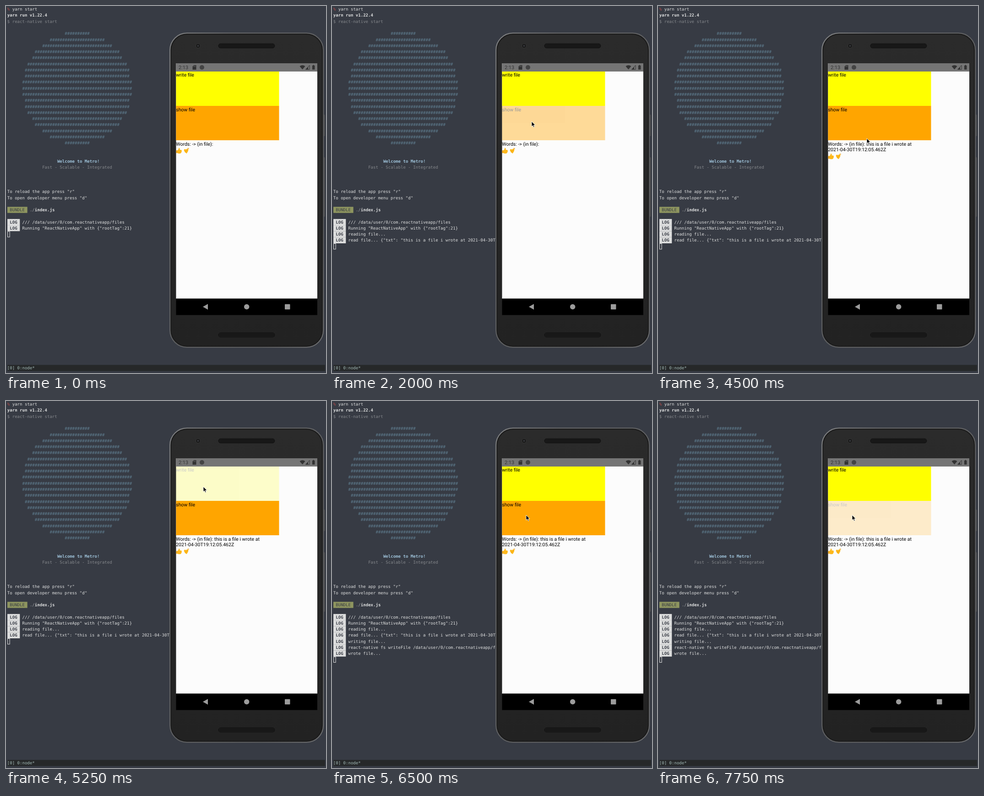
Recreate the animation shown at these times as an HTML page. Size 699 by 801 pixels, loop 8 s.

```html
<!DOCTYPE html>
<html lang="en">
<head>
<meta charset="utf-8">
<title>File read and write demo</title>
<style>
  html, body { margin: 0; width: 100%; height: 100%; overflow: hidden; background: #373b44; }
  svg { display: block; width: 699px; height: 801px; }
  text { white-space: pre; text-rendering: geometricPrecision; }
  #term text { font: 9.06px "DejaVu Sans Mono", monospace; fill: #dfe0e0; }
  #term .b { font-weight: 700; }
  #term .dim { fill: #85888c; }
  #term .hash { fill: #5f7d8f; }
  #term .tag { fill: #373b44; }
  #phone text { font: 10.55px Roboto, sans-serif; fill: #000; }
</style>
</head>
<body>
<svg viewBox="0 0 699 801" xmlns="http://www.w3.org/2000/svg">
  <defs>
    <linearGradient id="rim" x1="0" y1="0" x2="1" y2="1">
      <stop offset="0" stop-color="#7f8082"/>
      <stop offset=".2" stop-color="#646567"/>
      <stop offset=".8" stop-color="#5a5b5d"/>
      <stop offset="1" stop-color="#6c6d6f"/>
    </linearGradient>
    <linearGradient id="face" x1="0" y1="0" x2="0" y2="1">
      <stop offset="0" stop-color="#2b2b2b"/>
      <stop offset="1" stop-color="#222"/>
    </linearGradient>
    <pattern id="mesh" width="3" height="3" patternUnits="userSpaceOnUse">
      <rect width="3" height="3" fill="#131313"/>
      <circle cx="1.5" cy="1.5" r=".7" fill="#303030"/>
    </pattern>
  </defs>

  <rect width="699" height="801" fill="#373b44"/>
  <g id="term"></g>

  <g id="phone">
    <rect x="693" y="237" width="4" height="47" rx="1.5" fill="#4a4b4e"/>
    <rect x="693" y="330" width="4" height="130" rx="1.5" fill="#4a4b4e"/>
    <rect x="358.2" y="59.2" width="335" height="685.6" rx="37" fill="#1b1b1b" stroke="url(#rim)" stroke-width="2.2"/>
    <rect x="361.5" y="62.5" width="328.5" height="679" rx="34" fill="url(#face)"/>
    <rect x="464" y="82" width="123" height="10" rx="5" fill="url(#mesh)" stroke="#141414"/>
    <rect x="464" y="713" width="123" height="10" rx="5" fill="url(#mesh)" stroke="#141414"/>
    <circle cx="419.5" cy="87" r="5" fill="#1a1a1a" stroke="#383838"/>
    <circle cx="419.5" cy="87" r="2" fill="#35373b"/>

    <rect x="371.5" y="125" width="308.5" height="514" fill="#fcfcfc"/>
    <rect x="371.5" y="125" width="308.5" height="18" fill="#757575"/>
    <g fill="#333">
      <text x="377" y="138" style="font-size:11px;fill:#333">2:13</text>
      <path d="M410.5 129H415.5V139H407.5V132Z"/>
      <path d="M409.8 130.5v2M411.6 130v2.5M413.4 130v2.5" stroke="#757575" stroke-width=".8"/>
      <circle cx="428" cy="134" r="5" fill="#444"/>
      <path d="M641.5 131.5Q647.5 126.8 653.5 131.5L647.5 138.5Z"/>
      <path d="M663 129.5V138.5H654.5Z" fill="none" stroke="#333"/>
      <path d="M660 133V138.5H654.5Z"/>
      <path d="M669 130h1.5v-1.2h2.5v1.2h1.5v8.7h-5.5z"/>
    </g>

    <g id="write">
      <rect x="371.5" y="143" width="225" height="75" fill="#ff0"/>
      <text x="371.2" y="154.4">write file</text>
    </g>
    <g id="show">
      <rect x="371.5" y="218" width="225" height="75" fill="#ffa500"/>
      <text x="371.2" y="229.6">show file</text>
    </g>
    <text x="371.2" y="304.7" id="words"></text>
    <text x="371.2" y="317" id="stamp"></text>
    <g id="emoji" fill="#fdb81a">
      <path d="M371.7 315h3v6h-3z" fill="#f0a312"/>
      <path d="M374.5 315.2Q377.6 312.5 377.3 310Q379.8 309 379.7 314H382.5Q384.3 314.3 383.7 316Q384.5 317.4 383.3 318.6Q383.6 320 382.2 320.6Q382 322 380 322H377L374.5 321Z"/>
      <path d="M394.5 322Q390.5 319.5 389 316Q388 312.6 391 312.2Q392.7 312.2 393.4 313.8Q394.4 311 396.8 311.8Q399.2 313.2 397.8 316.4Q396.4 319.3 394.5 322Z"/>
      <path d="M391 319.5L398.2 310.8M396.4 310.4h2.6v2.6" fill="none" stroke="#f0a312" stroke-width=".9"/>
    </g>

    <rect x="371.5" y="638.5" width="308.5" height="36" fill="#000"/>
    <g fill="#9c9c9c">
      <path d="M430 656.5L441 650.3V662.7Z"/>
      <circle cx="525.7" cy="656.5" r="5.7"/>
      <rect x="609" y="650.8" width="11.5" height="11.5" rx="1"/>
    </g>
  </g>

  <path id="mouse" d="M0 0V11.2L2.6 8.8L4.4 12.9L6.2 12.1L4.5 8.1H8Z" fill="#000" stroke="#fff" stroke-width=".9" stroke-linejoin="round"/>
</svg>

<script>
const NS = 'http://www.w3.org/2000/svg';
const LOOP = 8000, STEP = 250;
const COL = 300 / 55, ROW = 13.27;
const $ = id => document.getElementById(id);
const term = $('term');

function add(parent, tag, attrs, text = '') {
  const el = document.createElementNS(NS, tag);
  for (const key in attrs) el.setAttribute(key, attrs[key]);
  el.textContent = text;
  parent.appendChild(el);
  return el;
}

const cellX = col => 2.8 + col * COL;
const cellY = row => 0.4 + row * ROW;
const print = (row, col, text, cls = '', parent = term) =>
  add(parent, 'text', { x: cellX(col), y: cellY(row) + 9.8, class: cls }, text);
const fillCells = (row, x, width, fill, parent = term) =>
  add(parent, 'rect', { x, y: cellY(row), width, height: ROW + .05, fill });

print(0, 0, '%').style.fill = '#b44c4c';
print(0, 2, 'yarn start');
print(1, 0, 'yarn run v1.22.4', 'b');
print(2, 0, '$ react-native start', 'dim');

// Plain disc of hash signs
for (let row = 4; row <= 22; row++) {
  const half = Math.round(22 * Math.sqrt(1 - ((row - 13) / 9.2) ** 2));
  print(row, 28 - half, '#'.repeat(2 * half), 'hash');
}

print(25, 20, 'Welcome to Metro!', 'b').style.fill = '#9fc3da';
print(26, 14, 'Fast - Scalable - Integrated', 'dim');
print(30, 0, 'To reload the app press "r"');
print(31, 0, 'To open developer menu press "d"');
fillCells(33, 3, 8 * COL, '#8e955f');
print(33, 1, 'BUNDLE', 'tag');
print(33, 9, './').style.fill = '#a4a6a9';
print(33, 11, 'index.js', 'b');
fillCells(59, 3, 694, '#262829');
print(59, 0, '[0] 0:node*').style.fill = '#a5bdba';

const logs = [
  '/// /data/user/0/com.reactnativeapp/files',
  'Running "ReactNativeApp" with {"rootTag":21}',
  'reading file...',
  'read file... {"txt": "this is a file i wrote at 2021-04-30T19:12:05.462Z"}',
  'writing file...',
  'react-native fs writeFile /data/user/0/com.reactnativeapp/files/file.json',
  'wrote file...'
].map((text, i) => {
  const line = add(term, 'g', {});
  fillCells(35 + i, 3, 5 * COL, '#dcdddd', line);
  print(35 + i, 1, 'LOG', 'b tag', line);
  print(35 + i, 6, text, '', line);
  return line;
});
const caret = add(term, 'rect', { x: 3.5, width: 4.6, height: 12.2, fill: 'none', stroke: '#e4e4e4' });

// [time, x, y]
const mousePath = [
  [500, 623, 389], [750, 562, 300], [1000, 478, 190], [1250, 452, 206], [1500, 452, 240],
  [1750, 436, 252], [2250, 434, 262], [2500, 398, 340], [2750, 335, 440], [3000, 300, 474],
  [3250, 318, 508], [3500, 290, 517], [3750, 210, 518], [4000, 136, 518], [4250, 300, 430],
  [4500, 456, 289], [4750, 442, 220], [5000, 431, 187], [5750, 431, 192], [6000, 429, 212],
  [6250, 426, 236], [6500, 424, 249]
];
// [time, opacity]
const showFade = [[0, 1], [1750, .2], [2000, .4], [2250, 1], [7500, .5], [7750, .2]];
const writeFade = [[0, 1], [5250, .2], [5500, .4], [5750, 1]];
const logCount = [[0, 2], [2000, 4], [5500, 7]];

const at = (table, t) => table.filter(entry => entry[0] <= t).pop();

function draw(t) {
  const pos = at(mousePath, t);
  $('mouse').setAttribute('visibility', pos ? 'visible' : 'hidden');
  if (pos) $('mouse').setAttribute('transform', `translate(${pos[1]} ${pos[2]})`);

  $('show').setAttribute('opacity', at(showFade, t)[1]);
  $('write').setAttribute('opacity', at(writeFade, t)[1]);

  const count = at(logCount, t)[1];
  logs.forEach((line, i) => line.setAttribute('visibility', i < count ? 'visible' : 'hidden'));
  caret.setAttribute('y', cellY(35 + count) + .6);

  const loaded = t >= 2250;
  $('words').textContent = 'Words: -> (in file):' + (loaded ? ' this is a file i wrote at' : '');
  $('stamp').textContent = loaded ? '2021-04-30T19:12:05.462Z' : '';
  $('emoji').setAttribute('transform', `translate(0 ${loaded ? 12.3 : 0})`);
}

let last = -1;
function tick() {
  const t = Math.floor(performance.now() % LOOP / STEP) * STEP;
  if (t !== last) draw(last = t);
  requestAnimationFrame(tick);
}
tick();
</script>
</body>
</html>
```
